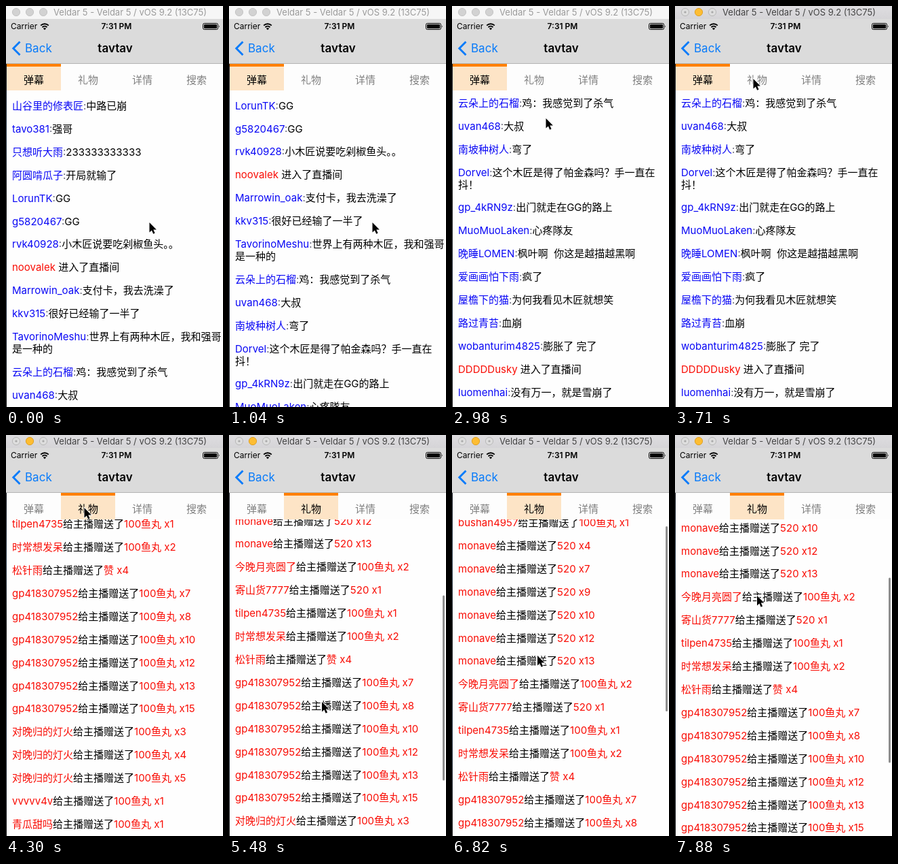
Write an HTML page that moves like this. It is 320 px wide and 589 px high and loops after 8 s.

```html
<!DOCTYPE html>
<html lang="zh-CN">
<head>
<meta charset="utf-8">
<title>Live chat</title>
<style>
  html, body { margin: 0; width: 100%; height: 100%; overflow: hidden; background: #fefefe; }
  body { font: 15px/17.9px Inter, "Noto Sans CJK SC", "Noto Sans CJK", sans-serif; color: #000; }
  #stage { position: relative; width: 320px; height: 589px; overflow: hidden; }
  #stage div, #stage svg { position: absolute; }
  #stage .row { position: static; padding: 8px 0 8px 9px; white-space: pre; }
  .blue { color: #0a08f5; }
  .red { color: #f90d05; }
  .colon { color: #556; }
  #list { left: 1px; top: 124px; width: 319px; height: 465px; overflow: hidden; }
  .page { left: -1px; top: 0; width: 320px; }
  #bar { left: 314px; width: 3px; height: 272px; border-radius: 2px; background: #8f8f8f; }
  #tabs { left: 1px; top: 85px; width: 319px; height: 39px; background: #fdfdfd; }
  #mark { left: 0; top: -1px; width: 80px; height: 40px; box-sizing: border-box; border-top: 5px solid #ff8000; background: #fde4c6; }
  .tab { top: 15px; width: 80px; text-align: center; color: #808080; }
  .tab.on { color: #000; }
  #nav { left: 0; top: 19px; width: 320px; height: 65px; background: #dbdbdb; border-bottom: 1px solid #b4b4b4; }
  #nav div { white-space: pre; line-height: 20px; }
  .wide { left: 1px; width: 320px; text-align: center; }
  #title { left: 0; top: 0; width: 320px; height: 19px; background: #f6f6f6; color: #9b9b9b; }
  #title.on { background: linear-gradient(#dedde0, #d5d4d7); color: #444; }
  #title div { left: 70px; top: 0; font-size: 13px; line-height: 19px; white-space: pre; }
  #title circle { fill: #d2d2d2; stroke: #c4c4c4; }
  #title .dot { display: none; }
  #title.on .dot { display: block; fill: #a8a8a8; stroke: none; }
  #title.on .side { fill: #dedede; stroke: #b8b8b8; }
  #title.on .mid { fill: #fdbd33; stroke: #dfa023; }
  #edge { left: 0; top: 85px; width: 1px; height: 504px; background: linear-gradient(#10141c, #26384a 20%, #101010 40%, #1c2a3c 70%, #0c0c0c); }
</style>
</head>
<body>
<div id="stage">
  <div id="list">
    <div class="page" id="chat"></div>
    <div class="page" id="gifts"></div>
    <div id="bar"></div>
  </div>
  <div id="tabs"><div id="mark"></div></div>
  <div id="nav">
    <div style="left:7px;top:1px;font-size:12px">Carrier</div>
    <svg style="left:50px;top:5px" width="15" height="12" fill="none" stroke="#000" stroke-width="1.9">
      <path d="M1.2 4.6a8.4 8.4 0 0 1 11.6 0M3.5 7.2a5 5 0 0 1 7 0"/>
      <path d="M7 11.2L4.9 9a3 3 0 0 1 4.2 0z" fill="#000" stroke="none"/>
    </svg>
    <div class="wide" style="left:3px;top:1px;font-size:12px;font-weight:600">7:31 PM</div>
    <svg style="left:290px;top:6px" width="26" height="11">
      <rect x=".5" y=".5" width="22" height="9" rx="2" fill="none" stroke="#000"/>
      <rect x="2" y="2" width="19" height="6" rx=".8"/>
      <path d="M24 3.2q1.6 1.8 0 3.6z"/>
    </svg>
    <svg style="left:8px;top:32px" width="16" height="24">
      <path d="M12.5 1.5L2.8 11.3l9.7 9.8" fill="none" stroke="#087bfa" stroke-width="2.9"/>
    </svg>
    <div style="left:28px;top:33px;font-size:17px;color:#087bfa">Back</div>
    <div class="wide" style="top:33px;font-size:17px;font-weight:600">tavtav</div>
  </div>
  <div id="title">
    <svg width="70" height="19">
      <circle class="side" cx="15" cy="9" r="5.6"/><circle class="dot" cx="15" cy="9" r="1.6"/>
      <circle class="mid" cx="35" cy="9" r="5.6"/>
      <circle class="side" cx="55" cy="9" r="5.6"/><circle class="dot" cx="55" cy="9" r="1.6"/>
    </svg>
    <div>Veldar 5 - Veldar 5 / vOS 9.2 (13C75)</div>
  </div>
  <div id="edge"></div>
  <svg id="cursor" style="left:0;top:0;overflow:visible" width="14" height="20">
    <path d="M0 0V14.6L3.4 11.4 5.7 16.7 8.1 15.6 5.8 10.6H10.4Z" stroke="#fff" stroke-width="1.6" paint-order="stroke"/>
  </svg>
</div>
<script>
const $ = id => document.getElementById(id);
const LOOP = 8000, MAX = 315;

const chat = `山谷里的修表匠:中路已崩
tavo381:强哥
只想听大雨:233333333333
阿圆啃瓜子:开局就输了
LorunTK:GG
g5820467:GG
rvk40928:小木匠说要吃剁椒鱼头。。
noovalek> 进入了直播间
Marrowin_oak:支付卡，我去洗澡了
kkv315:很好已经输了一半了
TavorinoMeshu:世界上有两种木匠，我和强哥|是一种的
云朵上的石榴:鸡：我感觉到了杀气
uvan468:大叔
南坡种树人:弯了
Dorvel:这个木匠是得了帕金森吗？手一直在|抖！
gp_4kRN9z:出门就走在GG的路上
MuoMuoLaken:心疼隊友
晚睡LOMEN:枫叶啊  你这是越描越黑啊
爱画画怕下雨:疯了
屋檐下的猫:为何我看见木匠就想笑
路过青苔:血崩
wobanturim4825:膨胀了 完了
DDDDDusky> 进入了直播间
luomenhai:没有万一，就是雪崩了`.split('\n');

// sender, gift, combo counts
const gifts = [
  ['bushan4957', '100鱼丸', 1],
  ['monave', '520', 4, 7, 9, 10, 12, 13],
  ['今晚月亮圆了', '100鱼丸', 2],
  ['寄山货7777', '520', 1],
  ['tilpen4735', '100鱼丸', 1],
  ['时常想发呆', '100鱼丸', 2],
  ['松针雨', '赞', 4],
  ['gp418307952', '100鱼丸', 7, 8, 10, 12, 13, 15],
  ['对晚归的灯火', '100鱼丸', 3, 4, 5],
  ['vvvvv4v', '100鱼丸', 1],
  ['青瓜甜吗', '100鱼丸', 1]
];

const span = (cls, text) => `<span class="${cls}">${text}</span>`;
const row = html => `<div class="row">${html}</div>`;

$('chat').innerHTML = chat.map(line => {
  const [, name, sep, text] = line.match(/^([^:>]+)([:>])(.*)$/);
  const head = sep === ':' ? span('blue', name) + span('colon', ':') : span('red', name);
  return row(head + text.replace('|', '\n'));
}).join('');

$('gifts').innerHTML = gifts.flatMap(([name, gift, ...counts]) =>
  counts.map(n => row(span('red', name) + '给主播赠送了' + span('red', `${gift} x${n}`)))
).join('');

const tabs = ['弹幕', '礼物', '详情', '搜索'].map((text, i) => {
  const el = document.createElement('div');
  el.className = 'tab';
  el.textContent = text;
  el.style.left = i * 80 + 'px';
  $('tabs').append(el);
  return el;
});

// moments at which the screen refreshes
const ticks = [0, 590, 740, 890, 1040, 1190, 1340, 1480, 1930, 2080, 2230, 2380, 2530, 2680, 2830,
  2980, 3130, 3270, 3420, 3710, 4010, 4150, 4300, 4740, 4890, 5180, 5330, 5480, 5780, 5930,
  6230, 6380, 6530, 6680, 6820, 6990, 7140, 7290, 7440, 7730, 7880];

const chatScroll = [[440, 0], [1480, 221.7], [1780, 221.7], [1930, 223], [2980, 394.5]];
const giftScroll = [[5030, MAX], [5480, 184], [6080, 184], [6820, 12], [7140, 2], [7440, 0], [7580, 0], [7880, 140]];
const barAlpha = [[5030, 0], [5180, 1], [5630, 1], [5930, 0], [6080, 0], [6230, 1], [7290, 1], [7440, .4], [7730, 1]];
const slide = [[3860, 0], [4300, 1]];
const pointer = [[2380, 211.5, 318], [2980, 138.5, 165], [3420, 115.5, 107], [4590, 115.5, 107],
  [4890, 128.5, 246], [5030, 128.5, 246], [5480, 137, 392], [5630, 137, 392], [5930, 128.5, 246],
  [6080, 128.5, 246], [6820, 126, 324], [7580, 126, 324], [7880, 121, 236]];

// eased value of a key list at time t
function at(keys, t, k = 1) {
  const i = keys.findIndex(key => key[0] > t);
  if (i === 0) return keys[0][k];
  if (i < 0) return keys[keys.length - 1][k];
  const a = keys[i - 1], b = keys[i];
  const u = (t - a[0]) / (b[0] - a[0]);
  return a[k] + (b[k] - a[k]) * u * u * (3 - 2 * u);
}

const move = (id, x, y) => { $(id).style.transform = `translate(${x}px, ${y}px)`; };

function draw(now) {
  const time = now % LOOP;
  const t = ticks.filter(v => v <= time).pop();
  const s = at(slide, t), scroll = at(giftScroll, t);
  move('chat', -320 * s, 5.8 - at(chatScroll, t));
  move('gifts', 320 * (1 - s), -scroll);
  move('mark', 80 * s, 0);
  move('bar', 0, 3 + scroll * .59);
  move('cursor', at(pointer, t), at(pointer, t, 2));
  $('bar').style.opacity = at(barAlpha, t);
  $('title').classList.toggle('on', t >= 3710);
  tabs.forEach((el, i) => el.classList.toggle('on', i === Math.round(s)));
  requestAnimationFrame(draw);
}
draw(0);
</script>
</body>
</html>
```
